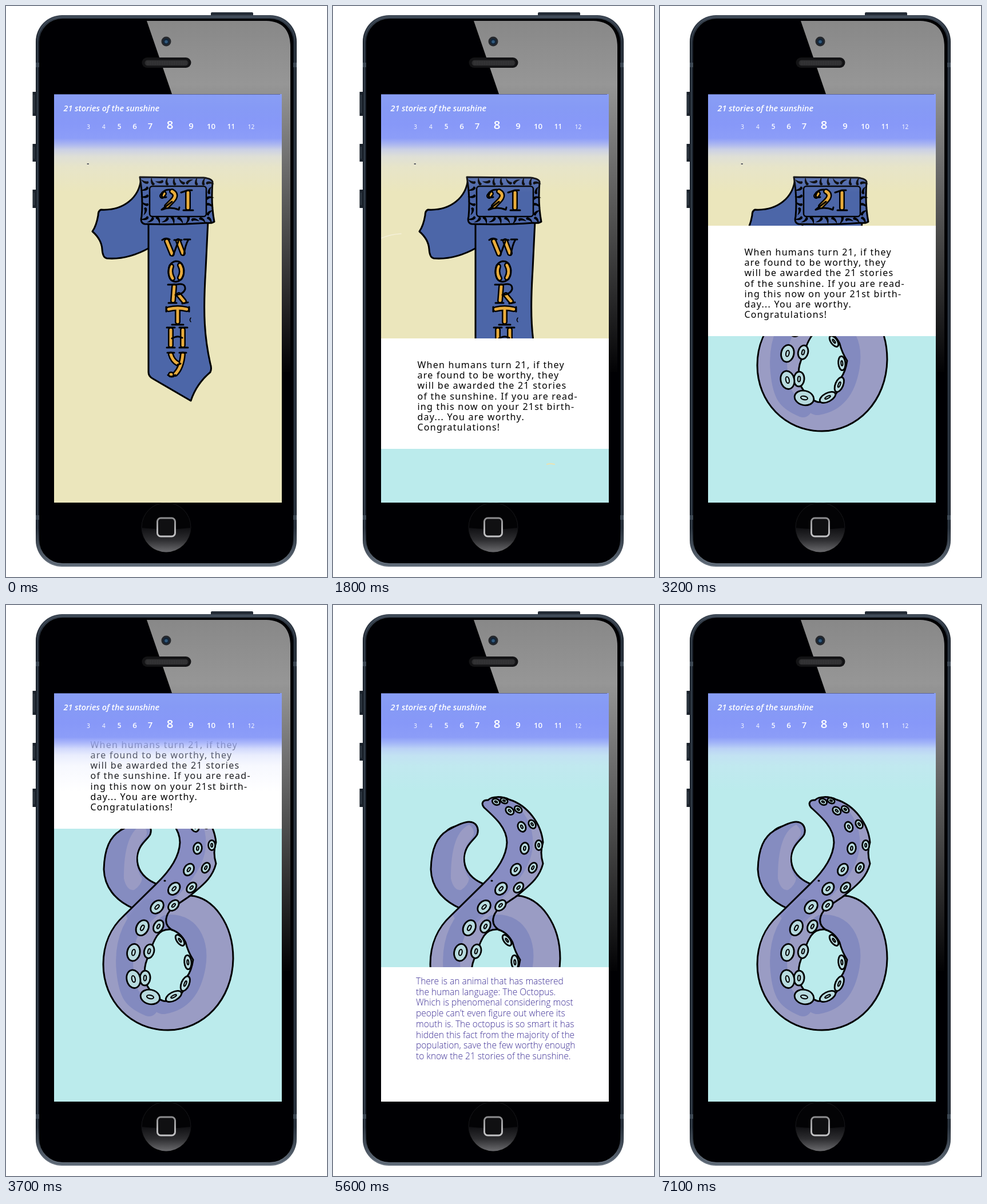
Recreate the animation shown at these times as an HTML page. Size 561 by 998 pixels, loop 8000 ms.

```html
<!DOCTYPE html>
<html lang="en">
<head>
<meta charset="utf-8">
<title>21 stories of the sunshine</title>
<style>
@property --y { syntax: '<length>'; inherits: true; initial-value: 868px; }
@property --z { syntax: '<length>'; inherits: true; initial-value: 868px; }
html, body { margin: 0; width: 561px; height: 998px; overflow: hidden; background: #fff; }
#stage { position: relative; width: 561px; height: 998px; overflow: hidden;
  animation: intro 8s step-end infinite, fact 8s step-end infinite; }
svg { position: absolute; left: 0; top: 0; display: block; }
#screen { position: absolute; left: 84px; top: 154px; width: 398px; height: 714px;
  overflow: hidden; background: #bbebec; }
#one { position: absolute; left: 0; top: 0; width: 398px; height: calc(var(--y) - 154px);
  overflow: hidden; background: #ebe6bc; }
.panel { position: absolute; left: 0; width: 398px; box-sizing: border-box;
  background: #fff; white-space: pre; }
#intro { top: calc(var(--y) - 154px); height: 193px; padding: 37px 0 0 63.5px; color: #000;
  font: 500 16px/18.2px 'Noto Sans', sans-serif; letter-spacing: 1.24px; }
#fact { top: calc(var(--z) - 154px); height: 714px; padding: 15px 0 0 61px; color: #3b2d95;
  font: 300 15.56px/18.7px 'Open Sans', sans-serif; }
#head { position: absolute; left: 0; top: 0; width: 398px; height: 172px;
  background: linear-gradient(#899ef5, #869af5 24px, #8798f8 52px, #8c9df8 77px,
    rgba(158,172,250,.86) 87px, rgba(186,197,250,.66) 97px, rgba(205,214,251,.42) 109px,
    rgba(215,222,252,.2) 127px, rgba(215,222,252,0) 172px); }
#head text { fill: #fff; font-family: 'Open Sans', sans-serif; }
.flash { animation: flash 8s step-end infinite; }
@keyframes intro {
  0% { --y: 868px; }
  12.5% { --y: 821px; }
  15% { --y: 818px; animation-timing-function: steps(10); }
  27.5% { --y: 423px; }
  40% { --y: 384px; animation-timing-function: steps(9); }
  51.24% { --y: 49px; }
  51.25%, 100% { --y: -200px; }
}
@keyframes fact {
  0% { --z: 868px; }
  63.75% { --z: 828px; animation-timing-function: steps(5); }
  70% { --z: 633px; }
  82.5% { --z: 672px; animation-timing-function: steps(5); }
  88.75%, 100% { --z: 868px; }
}
@keyframes flash {
  0%, 23.75%, 100% { opacity: 0; }
  22.5% { opacity: 1; }
}
</style>
</head>
<body>
<div id="stage">
  <svg width="561" height="998" viewBox="0 0 561 998">
    <defs>
      <linearGradient id="rim" x2="0" y2="1">
        <stop stop-color="#3c4653"/><stop offset=".05" stop-color="#1b222c"/>
        <stop offset=".93" stop-color="#1b222c"/><stop offset="1" stop-color="#6b7683"/>
      </linearGradient>
      <linearGradient id="glare" gradientUnits="userSpaceOnUse" x1="0" y1="26" x2="0" y2="640">
        <stop stop-color="#888"/><stop offset=".18" stop-color="#969696"/>
        <stop offset=".62" stop-color="#484848"/><stop offset="1" stop-color="#020204"/>
      </linearGradient>
      <linearGradient id="shine" x2="0" y2="1">
        <stop stop-color="#101013"/><stop offset=".5" stop-color="#2d2d30"/><stop offset="1" stop-color="#6b6b6e"/>
      </linearGradient>
      <linearGradient id="icon" x2="0" y2="1"><stop stop-color="#8d8d8f"/><stop offset="1" stop-color="#c4c4c6"/></linearGradient>
    </defs>
    <rect x="358" y="11" width="74" height="10" rx="2" fill="#242c36"/>
    <path d="M49.500 150V192M49.500 241V272M49.500 321V353" stroke="#1b222b" stroke-width="6"/>
    <path d="M49 155V187M49 246V267M49 326V348" stroke="#485461"/>
    <rect x="52" y="16" width="456" height="964" rx="46" fill="url(#rim)"/>
    <rect x="55" y="19" width="450" height="958" rx="43" fill="none" stroke="#4b5865"/>
    <path d="M52 103h6M502 103h6M52 894h6M502 894h6" stroke="#3d4854" stroke-width="8"/>
    <rect x="58" y="22" width="444" height="952" rx="41" fill="#000003"/>
    <path d="M246 26H455Q497 27 497 72V640H482V154H290Z" fill="url(#glare)"/>
    <circle cx="280" cy="62" r="8.500" fill="#26282c"/>
    <circle cx="280" cy="62" r="5.500" fill="#14263a"/>
    <circle cx="280" cy="62.500" r="2.800" fill="#31597c"/>
    <rect x="237.500" y="90" width="86" height="18" rx="9" fill="#131315"/>
    <rect x="242.500" y="94.500" width="76" height="10" rx="5" fill="#2b2b2d"/>
    <path d="M246 97H316M246 99.500H316M246 102H316" stroke="#4b4b4d" stroke-dasharray="1.500 1.500"/>
    <circle cx="280" cy="911" r="43" fill="#030305" stroke="#17171a"/>
    <path d="M237.500 912Q280 917 322.500 912A42.500 42.500 0 0 1 237.500 912Z" fill="url(#shine)"/>
    <rect x="264.500" y="895" width="31" height="32" rx="6" fill="#101012" stroke="url(#icon)" stroke-width="3"/>
  </svg>

  <div id="screen">
    <svg width="398" height="714" viewBox="84 154 398 714" stroke-linejoin="round" stroke-linecap="round">
      <defs>
        <path id="body" fill-rule="evenodd" clip-rule="evenodd" d="M322 508C362 510 397 558 397 618C396 690 345 743 283 743C218 743 170 692 170 628C170 592 184 563 206 543L262 488C285 466 303 442 304 415C304 390 284 372 264 354C258 347 262 340 271 341C277 334 296 334 308 340C340 350 364 382 367 415Q361 432 367 452C360 480 340 492 322 508Z
          M288 567Q305 572 314 590Q318 606 327 620Q324 640 316 650Q314 672 304 682Q290 694 275 692Q262 688 256 676Q244 668 243 650Q240 630 250 612Q256 590 264 578Q272 566 288 567Z"/>
        <clipPath id="inside"><use href="#body"/></clipPath>
      </defs>
      <path d="M177 432Q178 407 191 403Q200 387 216 385Z"/>
      <path d="M222 530C190 516 172 492 171 462C172 425 182 405 200 394C214 386 228 379 238 379C250 379 256 390 252 401C248 410 231 418 229 442C229 462 240 478 264 488Z" fill="#858cc0" stroke="#000" stroke-width="3"/>
      <path d="M238 384C212 396 206 436 206 478Q211 500 224 498Q236 490 238 478C226 460 222 430 242 408Q252 396 238 384Z" fill="#9a9bc4"/>
      <use href="#body" fill="#9a9cc4"/>
      <g clip-path="url(#inside)" fill="none" stroke="#838abf">
        <path d="M284 562C325 560 333 600 328 630S310 688 275 694" stroke-width="42"/>
        <path d="M266 346C312 362 332 400 320 435S270 500 235 535" stroke-width="52" stroke="#888dc3"/>
        <path d="M250 528C212 560 204 600 208 640S220 692 250 704" stroke-width="30"/>
      </g>
      <g fill="none" stroke="#000" stroke-width="3">
        <use href="#body"/>
        <path d="M322 508C300 524 283 530 280 548Q278 560 290 568M277 482h1"/>
      </g>
      <g id="cups" stroke="#000"></g>
      <path class="flash" d="M374 801q6-2 13 0" fill="none" stroke="#eae3b4" stroke-width="2"/>
    </svg>

    <div id="one">
      <svg width="398" height="714" viewBox="84 154 398 714" stroke-linejoin="round" stroke-linecap="round">
        <path class="flash" d="M84 406Q100 399 119 398" fill="none" stroke="#f5f1da" stroke-width="1.500"/>
        <path d="M142.500 276h1.500" stroke="#222" stroke-width="2"/>
        <g fill="#4c66a8" stroke="#000" stroke-width="3">
          <path d="M236 300C234 335 205 358 166 356Q161 358 161 366Q158 384 151 394Q167 408 168 425Q169 440 176 441Q212 444 250 423L260 370Z"/>
          <path d="M249 376V640Q249 647 256 651L323 690Q333 660 357 640Q360 634 357 625C347 580 344 540 349 460L353 376Z"/>
          <path d="M234 299Q290 300 345 300Q361 302 361 308Q358 345 364 377Q360 380 350 379Q300 383 242 381Q234 379 237 368Q240 335 234 299Z"/>
        </g>
        <g id="frill"></g>
        <rect x="251" y="315" width="99" height="53" rx="5" fill="#4c66a8" stroke="#000" stroke-width="2.500"/>
        <defs>
          <path id="stems" d="M290 324Q301 330 290 341L281 350M273 332l3-4M318 326V353
            M281 411L290 433M301 411L309 432M289 455Q285 466 291 476M304 453Q310 464 304 475
            M294 490L292 515M302 505L311 516M284 530Q300 526 316 530M300 532V552
            M288 566V593M309 566V593M288 609Q291 620 300 625M309 609Q307 632 296 643M288 644h1"/>
        </defs>
        <g fill="none" stroke="#000">
          <use href="#stems" stroke-width="10"/>
          <use href="#stems" stroke="#e9ac3c" stroke-width="5"/>
          <path stroke-width="3" d="M272 332Q274 320 287 321M280 334Q272 336 272 331M290 342L272 356Q287 350 302 356M302 356l1-4M306 326L318 322H325M310 357H327
            M273 409q6-5 13-1M292 436L301 412M294 409h13M311 435Q313 418 319 408M311 408h11
            M297 446Q284 448 284 466Q285 482 297 482Q311 480 311 462Q309 446 297 446
            M283 487H297Q314 483 313 495Q310 504 296 505M284 519h14M308 520l10-2
            M280 526v8M320 526v8M290 557h20M281 562h14M303 562h14M281 597h14M303 597h15M290 581Q300 575 308 580
            M282 606h12M303 606h12M296 645Q289 651 283 645M300 627l5-2"/>
          <path d="M323 545q-3 4 0 7" stroke-width="1.500"/>
        </g>
      </svg>
    </div>

    <div class="panel" id="intro">When humans turn 21, if they
are found to be worthy, they
will be awarded the 21 stories
of the sunshine. If you are read-
ing this now on your 21st birth-
day... You are worthy.
Congratulations!</div>

    <div class="panel" id="fact">There is an animal that has mastered
the human language: The Octopus.
Which is phenomenal considering most
people can't even figure out where its
mouth is. The octopus is so smart it has
hidden this fact from the majority of the
population, save the few worthy enough
to know the 21 stories of the sunshine.</div>

    <div id="head">
      <svg width="398" height="172" viewBox="84 154 398 172">
        <path d="M84 154H479" stroke="#2c3350"/>
        <text x="100.500" y="184" font-size="14.400" font-weight="600" font-style="italic">21 stories of the sunshine</text>
        <g id="nums" text-anchor="middle"></g>
      </svg>
    </div>
  </div>
</div>
<script>
const put = (id, count, draw) => {
  document.getElementById(id).innerHTML += Array.from({ length: count }, (_, i) => draw(i)).join('');
};
const curve = d => {
  const path = document.createElementNS('http://www.w3.org/2000/svg', 'path');
  path.setAttribute('d', d);
  return path;
};

// Chapter numbers shrink away from the current one
put('nums', 10, i => {
  const d = i - 5, far = Math.abs(d);
  const x = 286.5 + (d < 0 ? 27 * d - 7.5 : d > 0 ? 35 * d + 2 : 0);
  const size = d ? Math.max(10, 16.5 - 1.6 * far) : 20.5;
  return `<text x="${x}" y="214.500" font-size="${size}" font-weight="${far < 4 ? 600 : 400}">${i + 3}</text>`;
});

// A row of suckers along a curve, sized from r0 to r1 and more widely spaced as it goes
function suckers(d, count, r0, r1, flat) {
  const path = curve(d), length = path.getTotalLength();
  put('cups', count, i => {
    const t = i / (count - 1), at = length * t ** 1.16;
    const p = path.getPointAtLength(at);
    const a = path.getPointAtLength(at - 1), b = path.getPointAtLength(at + 1);
    const turn = Math.atan2(b.y - a.y, b.x - a.x) * 180 / Math.PI;
    const r = r0 + (r1 - r0) * t;
    return `<g transform="translate(${p.x} ${p.y}) rotate(${turn})" fill="#b8dbdf">` +
      `<ellipse rx="${r}" ry="${r * flat}" stroke-width="2.800"/>` +
      `<ellipse rx="${r * .36}" ry="${r * flat * .25}" stroke-width="2"/></g>`;
  });
}
suckers('M299 342C340 362 364 395 359 430S325 495 297 521S247 590 243 652', 10, 6.5, 13, .7);
suckers('M285 344C322 362 342 395 334 430S290 500 262 530S214 612 222 650S240 682 252 685', 11, 7, 17, .74);
suckers('M293 684Q316 672 318 640T304 586', 4, 15, 11, .5);

// Ruffled border: curled drops around the number plate
const edge = curve('M243 307H356V374H243Z');
put('frill', 28, i => {
  const p = edge.getPointAtLength(i / 28 * edge.getTotalLength());
  return `<path transform="translate(${p.x} ${p.y}) rotate(${i * 360 / 28 + 50 * Math.sin(i * 2.3)})" ` +
    `d="M-7 -4Q-3 4 4 4Q8 2 5 -1Q1 1 -7 -4Z"/>`;
});
</script>
</body>
</html>
```
